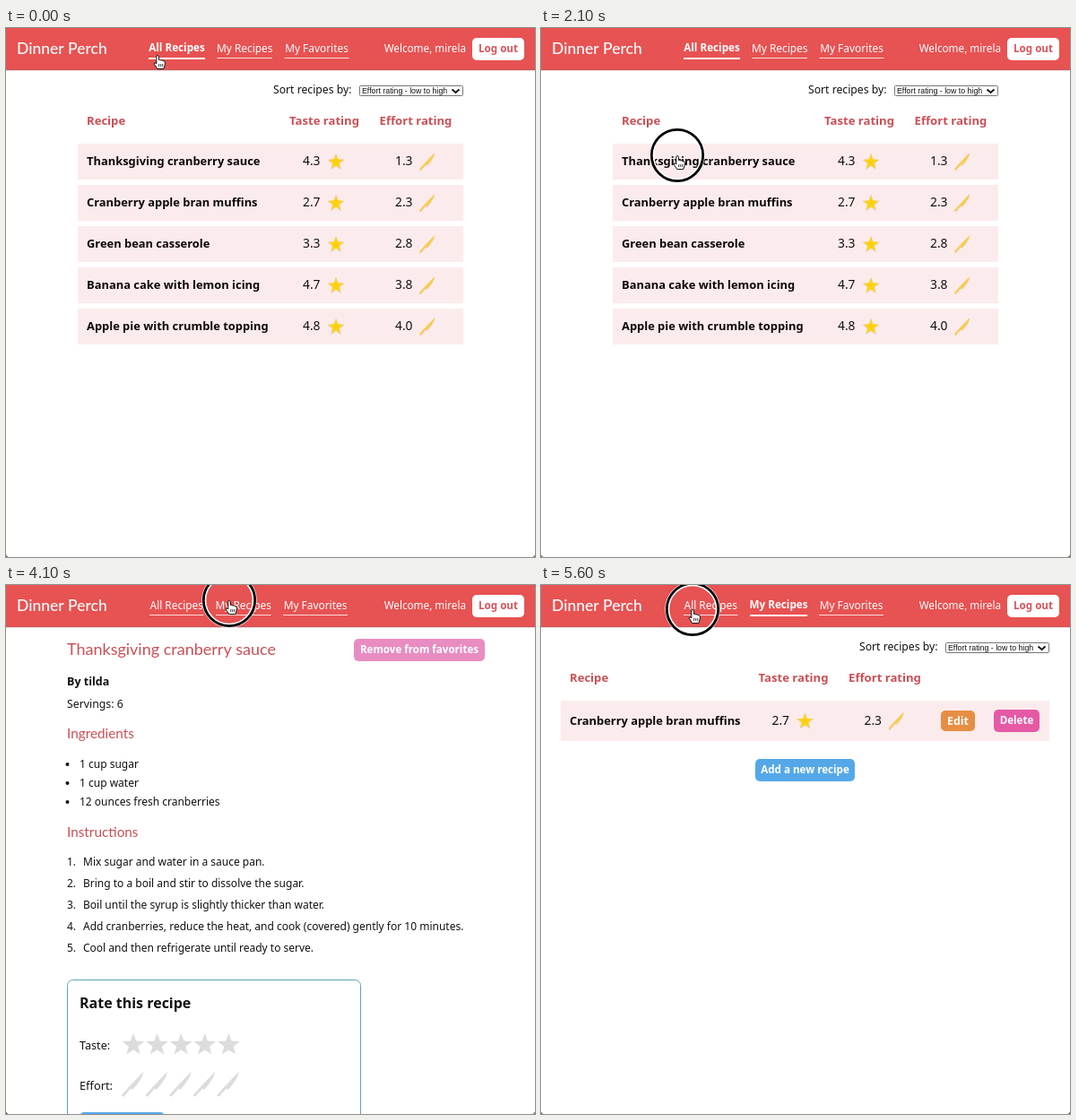
Write an HTML page with a canvas that moves like this. It is 590 px wide and 590 px high and loops after 5.7 s.

```html
<!DOCTYPE html>
<html lang="en">
<head>
<meta charset="utf-8">
<title>Recipes</title>
<style>
html, body { margin: 0; width: 100%; height: 100%; overflow: hidden; background: #fff; }
canvas { display: block; width: 590px; height: 590px; }
</style>
</head>
<body>
<canvas id="stage"></canvas>
<script>
const SIZE = 590, LOOP = 5700, STEP = 100;
const canvas = document.getElementById('stage');
const ctx = canvas.getContext('2d');
const ratio = window.devicePixelRatio || 1;
canvas.width = canvas.height = SIZE * ratio;

const BODY = '"Noto Sans", "Open Sans", sans-serif';
const TITLE = 'Lato, "Noto Sans", sans-serif';
const SYSTEM = '"Liberation Sans", Arial, sans-serif';
const RED = '#e75252', DARK_RED = '#c94f55', PALE = '#fcebec';

function text(str, x, y, { size = 12, weight = 400, color = '#111', family = BODY, align = 'left' } = {}) {
  ctx.font = `${weight} ${size}px ${family}`;
  ctx.fillStyle = color;
  ctx.textAlign = align;
  ctx.fillText(str, x, y);
}

function rect(x, y, w, h, color) {
  ctx.fillStyle = color;
  ctx.fillRect(x, y, w, h);
}

function button(label, x, y, w, h, color, baseline, ink = '#fff', size = 11.6) {
  ctx.fillStyle = color;
  ctx.beginPath();
  ctx.roundRect(x, y, w, h, 5);
  ctx.fill();
  text(label, x + w / 2, baseline, { size, weight: 700, color: ink, align: 'center' });
}

function star(x, y, r, fill) {
  ctx.beginPath();
  for (let i = 0; i < 10; i++) {
    const a = i * Math.PI / 5 - Math.PI / 2;
    const d = i % 2 ? r * 0.42 : r;
    ctx.lineTo(x + d * Math.cos(a), y + d * Math.sin(a));
  }
  ctx.closePath();
  ctx.fillStyle = fill;
  ctx.fill();
}

function goldStar(x, y) {
  const g = ctx.createRadialGradient(x, y, 1, x, y, 9);
  g.addColorStop(0, '#fad000');
  g.addColorStop(0.6, '#fbd42c');
  g.addColorStop(1, '#ecc45c');
  star(x, y + 0.6, 10, 'rgba(215, 185, 130, .45)');
  star(x, y, 9.3, g);
}

// Knife along the rising diagonal, blade towards the upper right.
function knife(x, y, length, fill) {
  ctx.save();
  ctx.translate(x, y);
  ctx.rotate(-0.8);
  ctx.scale(length, length);
  ctx.fillStyle = fill;
  ctx.beginPath();
  ctx.moveTo(-0.5, -0.03);
  ctx.lineTo(-0.15, -0.045);
  ctx.lineTo(0.5, -0.05);
  ctx.quadraticCurveTo(0.36, 0.08, -0.13, 0.1);
  ctx.lineTo(-0.15, 0.035);
  ctx.lineTo(-0.48, 0.05);
  ctx.closePath();
  ctx.fill();
  ctx.restore();
}

function goldKnife(x, y) {
  knife(x + 0.4, y + 0.7, 26, 'rgba(220, 190, 150, .45)');
  knife(x, y, 25, '#f6cd4e');
}

const LINKS = ['All Recipes', 'My Recipes', 'My Favorites'];
const NAV = {
  all: { active: 0, spans: [[159, 222], [235.5, 297], [310.5, 382.5]] },
  recipe: { active: -1, spans: [[160, 220.5], [234, 295.5], [309, 381]] },
  mine: { active: 1, spans: [[159, 219.5], [233, 297], [310, 382]] }
};

function header(page) {
  rect(0, 0, SIZE, 47, RED);
  rect(0, 46, SIZE, 1, '#c9585a');
  rect(0, 47, SIZE, 1, '#eadcdc');
  text('Dinner Perch', 12, 29, { size: 17.5, weight: 500, color: '#fff', family: TITLE });
  const { active, spans } = NAV[page];
  spans.forEach(([left, right], i) => {
    const on = i === active;
    text(LINKS[i], (left + right) / 2, on ? 26 : 27, {
      size: on ? 11.7 : 11.9, weight: on ? 700 : 500, color: '#fff', align: 'center'
    });
    rect(left, 33, right - left, on ? 2 : 1, on ? '#fff' : '#fbdcdc');
  });
  text('Welcome, mirela', 513, 27, { size: 11.7, weight: 500, color: '#fff', align: 'right' });
  button('Log out', 520, 11, 58, 25, '#fff', 27, '#d5545a');
}

function sortBox(x) {
  text('Sort recipes by:', x - 96, 73, { size: 12.2 });
  ctx.strokeStyle = '#767676';
  ctx.lineWidth = 1;
  ctx.beginPath();
  ctx.roundRect(x + 0.5, 64.5, 115, 11, 1);
  ctx.stroke();
  text('Effort rating - low to high', x + 3, 73, { size: 8.8, family: SYSTEM });
  ctx.strokeStyle = '#111';
  ctx.lineWidth = 1.8;
  ctx.beginPath();
  ctx.moveTo(x + 103.5, 68.5);
  ctx.lineTo(x + 107.5, 72);
  ctx.lineTo(x + 111.5, 68.5);
  ctx.stroke();
}

function columns(left, shift) {
  const style = { size: 13.1, weight: 700, color: DARK_RED };
  text('Recipe', left + 10, 108, style);
  text('Taste rating', 355 + shift, 108, { ...style, align: 'center' });
  text('Effort rating', 457 + shift, 108, { ...style, align: 'center' });
}

function row([name, taste, effort], left, width, top, height, shift) {
  rect(left, top, width, height, PALE);
  const mid = top + height / 2;
  text(name, left + 10, mid + 4.4, { size: 12.9, weight: 700, color: '#0c0808' });
  text(taste, 331 + shift, mid + 4, { size: 13.8 });
  text(effort, 434 + shift, mid + 4, { size: 13.8 });
  goldStar(368 + shift, mid + 0.5);
  goldKnife(470 + shift, mid);
}

const RECIPES = [
  ['Thanksgiving cranberry sauce', '4.3', '1.3'],
  ['Cranberry apple bran muffins', '2.7', '2.3'],
  ['Green bean casserole', '3.3', '2.8'],
  ['Banana cake with lemon icing', '4.7', '3.8'],
  ['Apple pie with crumble topping', '4.8', '4.0']
];
const INGREDIENTS = ['1 cup sugar', '1 cup water', '12 ounces fresh cranberries'];
const INSTRUCTIONS = [
  'Mix sugar and water in a sauce pan.',
  'Bring to a boil and stir to dissolve the sugar.',
  'Boil until the syrup is slightly thicker than water.',
  'Add cranberries, reduce the heat, and cook (covered) gently for 10 minutes.',
  'Cool and then refrigerate until ready to serve.'
];

const PAGES = {
  all() {
    sortBox(394);
    columns(80, 0);
    RECIPES.forEach((r, i) => row(r, 80, 430, 129 + 46 * i, 40, 0));
  },

  recipe() {
    const heading = { size: 15.3, color: DARK_RED, family: TITLE };
    text(RECIPES[0][0], 68, 78, { ...heading, size: 18 });
    button('Remove from favorites', 388, 60, 146, 25, '#e88cc2', 76);
    text('By tilda', 68, 112, { size: 12.5, weight: 700 });
    text('Servings: 6', 68, 137, { size: 12.3 });
    text('Ingredients', 68, 171, heading);
    INGREDIENTS.forEach((item, i) => {
      const y = 204 + 21 * i;
      ctx.fillStyle = '#111';
      ctx.beginPath();
      ctx.arc(68.5, y - 4, 2, 0, 7);
      ctx.fill();
      text(item, 82, y);
    });
    text('Instructions', 68, 281, heading);
    INSTRUCTIONS.forEach((line, i) => {
      text(`${i + 1}.`, 68, 313 + 24 * i);
      text(line, 86, 313 + 24 * i);
    });

    ctx.strokeStyle = '#5fa3b5';
    ctx.lineWidth = 1;
    ctx.beginPath();
    ctx.roundRect(68.5, 440.5, 327, 200, 6);
    ctx.stroke();
    text('Rate this recipe', 82, 472, { size: 16, weight: 700 });
    text('Taste:', 82, 518, { size: 12.6 });
    text('Effort:', 82, 563, { size: 12.8 });
    for (let i = 0; i < 5; i++) {
      star(142 + 26.6 * i, 513, 13, '#dcdcdc');
      knife(142 + 26.6 * i, 557, 36, '#dcdcdc');
    }
    button('', 82, 588, 95, 25, '#55a8e8', 604);
  },

  mine() {
    sortBox(451);
    columns(22, -73.5);
    row(RECIPES[1], 22, 545, 129, 45, -73.5);
    button('Edit', 446, 140, 38, 23, '#e68e43', 156, '#fff', 12.3);
    button('Delete', 505, 139, 51, 25, '#e659a5', 155);
    button('Add a new recipe', 239, 194, 111, 25, '#55a8e8', 210);
  }
};

const MOVES = [
  { start: 1250, end: 2050, from: [169, 30], to: [152, 142] },
  { start: 3400, end: 4050, from: [152, 142], to: [249, 17] },
  { start: 5100, end: 5580, from: [249, 17], to: [169, 27] }
];
const CLICKS = [2100, 4100, 5600];

const ease = u => u < 0.5 ? 4 * u ** 3 : 1 - 4 * (1 - u) ** 3;

function pointer(t) {
  const move = MOVES.filter(m => t >= m.start).pop() || MOVES[0];
  const u = Math.min(1, Math.max(0, (t - move.start) / (move.end - move.start)));
  return move.from.map((a, i) => a + (move.to[i] - a) * ease(u));
}

function overLink(page, x, y) {
  if (y < 47) return y > 12 && y < 36 && NAV[page].spans.some(([a, b]) => x >= a && x <= b);
  return page === 'all' && y > 139 && y < 159;
}

const HAND = new Path2D('M-1.2 1.3Q0-.6 1.3 1.3L1.5 5.6Q2.9 4.6 3.7 6Q5.2 5.2 6.1 6.6Q8.5 6.2 8.5 8.7L8 12L6.8 15.6H-.2L-3.6 10.4Q-4.2 8.2-2.2 9L-1.2 10Z');
const FINGERS = new Path2D('M1.7 10V13M3.7 10V13M5.7 10V13');
const ARROW = new Path2D('M0 0V13.5L3.2 10.6L5.4 15.8L7.6 14.8L5.4 9.8H9.6Z');

function cursor(x, y, hand) {
  ctx.save();
  ctx.translate(x, y);
  ctx.lineJoin = 'round';
  ctx.lineWidth = 1;
  ctx.strokeStyle = hand ? '#111' : '#fff';
  ctx.fillStyle = hand ? '#fff' : '#000';
  const shape = hand ? HAND : ARROW;
  ctx.fill(shape);
  ctx.stroke(shape);
  if (hand) {
    ctx.lineWidth = 0.8;
    ctx.stroke(FINGERS);
  }
  ctx.restore();
}

function ring(x, y) {
  for (const [r, width, color] of [[28.2, 5, '#fff'], [28.7, 2.8, '#000']]) {
    ctx.strokeStyle = color;
    ctx.lineWidth = width;
    ctx.beginPath();
    ctx.arc(x, y, r, 0, 7);
    ctx.stroke();
  }
}

function corners() {
  ctx.fillStyle = '#777';
  for (const [x, d] of [[0, 1], [SIZE, -1]]) {
    ctx.beginPath();
    ctx.moveTo(x, SIZE);
    ctx.lineTo(x + 2.5 * d, SIZE);
    ctx.lineTo(x, SIZE - 2.5);
    ctx.fill();
  }
}

function draw(t) {
  const page = t < 2200 ? 'all' : t < 4200 ? 'recipe' : 'mine';
  ctx.setTransform(ratio, 0, 0, ratio, 0, 0);
  rect(0, 0, SIZE, SIZE, '#fff');
  header(page);
  PAGES[page]();
  corners();
  const [x, y] = pointer(t);
  if (CLICKS.includes(t)) ring(x, y);
  cursor(x, y, overLink(page, x, y));
}

const began = performance.now();
function tick() {
  const t = (performance.now() - began) % LOOP;
  draw(Math.floor(t / STEP) * STEP);
  requestAnimationFrame(tick);
}
tick();
</script>
</body>
</html>
```
